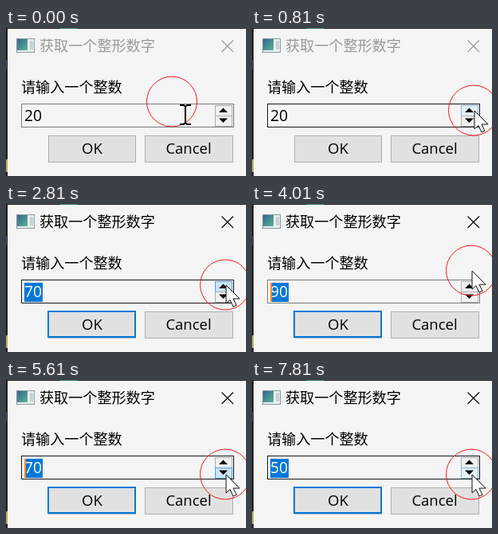
Write an HTML page that moves like this. It is 301 by 186 pixels and loops after 8000 ms.

```html
<!DOCTYPE html>
<html lang="zh">
<head>
<meta charset="utf-8">
<title>Integer input dialog</title>
<style>
html, body { margin: 0; width: 100%; height: 100%; overflow: hidden; background: #f5f5f5; }
svg { display: block; width: 301px; height: 186px; }
text { font-family: "Open Sans", "Noto Sans", sans-serif; font-size: 18.5px; }
.cjk { font-family: "Noto Sans CJK SC", "Noto Sans CJK", sans-serif; font-size: 18.1px; }
.crisp { shape-rendering: crispEdges; }
.btn { fill: #e1e1e1; stroke: #adadad; }
.spin { fill: #f0f0f0; stroke: #acacac; }
.hover { fill: #e5f1fb; stroke: #7eb4ea; }
.down { fill: #cce4f7; stroke: #569de5; }
</style>
</head>
<body>
<svg viewBox="0 0 301 186">
  <defs>
    <linearGradient id="teal" x2="1" y2="1">
      <stop stop-color="#35658d"/><stop offset="1" stop-color="#58b496"/>
    </linearGradient>
  </defs>
  <rect width="301" height="186" fill="#f5f5f5"/>
  <g class="crisp">
    <path d="M0 0H301V1H2V186H0Z" fill="#201d22"/>
    <path d="M68 0H90V1H68Z" fill="#2e7a62"/>
    <path d="M0 40H1V52H0Z" fill="#54469a"/>
    <path d="M0 165H2V181H0Z" fill="#b5ac55"/>
  </g>

  <rect x="13.5" y="13.5" width="22" height="17" fill="#eef1f2" stroke="#8c979e"/>
  <rect x="14" y="14" width="13" height="14" fill="url(#teal)"/>
  <path d="M30 16H34V27H30Z" fill="#c3d3d6"/>

  <g id="bar">
    <text class="cjk" x="42" y="29" fill="currentColor">获取一个整形数字</text>
    <path d="M270.5 15.5L285 30M285 15.5L270.5 30" stroke="currentColor" stroke-width="1.1"/>
  </g>
  <text class="cjk" x="19" y="80.5">请输入一个整数</text>

  <rect id="field" class="crisp" x="19.5" y="95.5" width="266" height="29" fill="#f5f5f5"/>
  <rect id="sel" class="crisp" x="23" y="99" width="23" height="24" fill="#0078d7"/>
  <text id="num" x="23" y="117" style="font-size:19.3px">20</text>
  <rect id="caret" class="crisp" x="23" y="99" width="2" height="24" fill="#ff8728"/>

  <rect id="up" class="crisp" x="262.5" y="97.5" width="21" height="13"/>
  <rect id="dn" class="crisp" x="262.5" y="110.5" width="21" height="13"/>
  <path d="M267 106H278L272.5 100.5ZM267 113.5H278L272.5 119Z"/>

  <rect class="btn crisp" x="53.5" y="135.5" width="109" height="33"/>
  <rect id="ring" class="crisp" x="53" y="135" width="109" height="32" fill="#e1e1e1" stroke="#0078d7" stroke-width="2"/>
  <rect class="btn crisp" x="174.5" y="135.5" width="110" height="33"/>
  <text x="108" y="157.5" text-anchor="middle">OK</text>
  <text x="229" y="157.5" text-anchor="middle">Cancel</text>

  <circle id="halo" r="31.5" fill="none" stroke="#f01818"/>
  <path id="beam" d="M-7 -12H-2L0 -10L2 -12H7M0 -10V10M-7 12H-2L0 10L2 12H7" fill="none" stroke="#000" stroke-width="2"/>
  <path id="arrow" d="M0 0V23L5 18.5L9 27L13 25.2L9 17H17Z" fill="#fff" stroke="#111"/>
</svg>
<script>
const LOOP = 8000, ACTIVE = 1410, BLINK = 415;
const $ = id => document.getElementById(id);

const clamp = v => Math.min(1, Math.max(0, v));
const ease = (t, a, b) => {
  const k = clamp((t - a) / (b - a));
  return k * k * (3 - 2 * k);
};

// key points of the pointer halo
const route = [
  { t: 210, x: 208, y: 92 },
  { t: 610, x: 282, y: 60 },
  { t: 810, x: 278, y: 103 },
  { t: 1010, x: 275, y: 101 },
  { t: 3910, x: 275, y: 101 },
  { t: 4210, x: 275, y: 32 },
  { t: 4610, x: 275, y: 118 }
];

// bursts of spin button clicks
const bursts = [
  { from: 1410, every: 350, count: 7, add: 10 },
  { from: 5210, every: 400, count: 3, add: -10 },
  { from: 7610, every: 400, count: 1, add: -10 }
];

function haloAt(t) {
  let { x, y } = route[0];
  for (let i = 1; i < route.length; i++) {
    const a = route[i - 1], b = route[i], k = ease(t, a.t, b.t);
    x += (b.x - a.x) * k;
    y += (b.y - a.y) * k;
  }
  return { x, y };
}

function spinAt(t) {
  let value = 20, pressed = false;
  for (const b of bursts) {
    const n = Math.floor((t - b.from) / b.every) + 1;
    const done = Math.min(b.count, Math.max(0, n));
    value += b.add * done;
    const age = t - b.from - (done - 1) * b.every;
    if (done && age < 100) pressed = true;
  }
  return { value, pressed };
}

const place = (id, x, y) => $(id).setAttribute("transform", `translate(${x} ${y})`);
const show = (id, on) => $(id).style.display = on ? "" : "none";
const style = (id, name) => $(id).setAttribute("class", "crisp " + name);

function draw(now) {
  const t = Math.max(0, Math.floor((now % LOOP - 10) / 100) * 100 + 10);
  const halo = haloAt(t);
  const lead = 1 + 16 * (1 - ease(t, 210, 610));
  const x = halo.x + lead, y = halo.y + lead;
  const inField = x > 19 && x < 286 && y > 95 && y < 125;
  const onSpin = inField && x > 262;
  const beam = inField && !onSpin;
  const active = t >= ACTIVE;
  const { value, pressed } = spinAt(t);

  place("halo", halo.x, halo.y + 0.5);
  place("beam", x, y);
  place("arrow", x, y);
  show("beam", beam);
  show("arrow", !beam);

  $("bar").style.color = active ? "#000" : "#999";
  $("field").setAttribute("stroke", t > 210 && inField ? "#171717" : "#7a7a7a");
  $("num").textContent = value;
  $("num").setAttribute("fill", active ? "#fff" : "#000");
  show("sel", active);
  show("caret", active && Math.floor((t - ACTIVE) / BLINK) % 2 === 0);
  show("ring", t >= 1110);

  const state = pressed ? "down" : "hover";
  style("up", onSpin && y < 111 ? state : "spin");
  style("dn", onSpin && y >= 111 ? state : "spin");
}

const start = performance.now();
function tick() {
  draw(performance.now() - start);
  requestAnimationFrame(tick);
}
tick();
</script>
</body>
</html>
```
